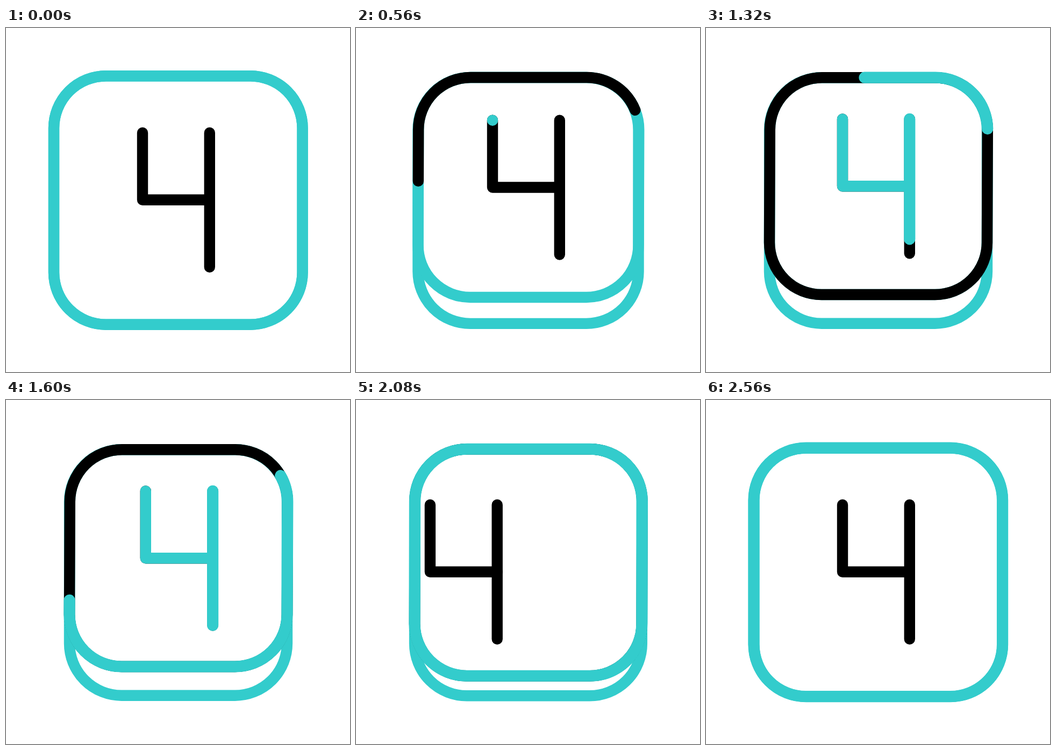
An HTML page that plays this animation: 640x640 px, repeating every 2.8 s.

```html
<!DOCTYPE html>
<html lang="en">
<head>
<meta charset="utf-8">
<title>Key four</title>
<style>
  html, body { margin: 0; width: 100%; height: 100%; overflow: hidden; background: #fff; }
  svg { display: block; width: 100%; height: 100%; }
  path { fill: none; stroke: #000; stroke-width: 20.4; stroke-linecap: round; stroke-linejoin: round; }
  .teal { stroke: #3cc; }
  .wide { stroke-width: 21.2; }
</style>
</head>
<body>
<svg viewBox="0 0 640 640">
  <defs>
    <clipPath id="window"><path class="face"/></clipPath>
    <g id="four">
      <path d="M254 195V319.8H378.8"/>
      <path d="M378.8 195V444.8"/>
    </g>
  </defs>
  <path id="base" class="teal"/>
  <g clip-path="url(#window)">
    <g id="leaving">
      <use href="#four"/>
      <path id="hook" class="teal" pathLength="100" d="M254 195V319.8H378.8"/>
      <path id="stem" class="teal wide" pathLength="100" d="M378.8 195V444.8"/>
    </g>
    <use id="entering" href="#four"/>
  </g>
  <path class="face teal"/>
  <path id="blackTrace" class="face" pathLength="100"/>
  <path id="tealTrace" class="face teal wide" pathLength="100"/>
</svg>
<script>
const LOOP = 2800, STEP = 40, RADIUS = 97, TRAVEL = 422;
const $ = id => document.getElementById(id);
const faces = document.querySelectorAll('.face');
const mix = (a, b, k) => a + (b - a) * k;

// Smooth 0..1 progress of a move that begins at start and lasts duration ms
function ease(t, start, duration) {
  const u = Math.min(1, Math.max(0, (t - start) / duration));
  return u * u * (3 - 2 * u);
}

// Clockwise rounded box from the foot of its left side; lean shifts the top half
function box(left, top, right, bottom, lean = 0) {
  const r = RADIUS, arc = `A${r} ${r} 0 0 1 `;
  const l = left + lean, rt = right + lean;
  return `M${left} ${bottom - r}L${l} ${top + r}${arc}${l + r} ${top}H${rt - r}` +
    `${arc}${rt} ${top + r}L${right} ${bottom - r}${arc}${right - r} ${bottom}` +
    `H${left + r}${arc}${left} ${bottom - r}Z`;
}

// Show a stretch of a path; offset and length are fractions of the whole
function trim(path, offset, length, least = 0) {
  path.style.display = length > least ? '' : 'none';
  path.style.strokeDasharray = length < 1 ? `${length * 100} ${100 - length * 100}` : 'none';
  path.style.strokeDashoffset = -offset * 100;
}

// Show the first part of an open path
function draw(path, length) {
  path.style.display = length > 0 ? '' : 'none';
  path.style.strokeDasharray = length < 1 ? `${length * 100} 200` : 'none';
}

function render(t) {
  const rise = ease(t, 50, 625) - ease(t, 1915, 446);
  const left = mix(89, 118, rise), right = mix(551.6, 523, rise), top = mix(89.2, 92.2, rise);
  $('base').setAttribute('d', box(left, top, right, mix(551.7, 549.7, rise)));
  const face = box(left, top, right, mix(551.7, 496, rise), 0.8 * rise);
  faces.forEach(path => path.setAttribute('d', face));

  const black = ease(t, 100, 1073), teal = ease(t, 1007, 1107);
  trim($('blackTrace'), -0.017 + 0.249 * black, teal < 1 ? black : 0, 0.003);
  trim($('tealTrace'), 0.217 + 0.448 * teal, teal, 0.003);

  draw($('hook'), ease(t, 550, 612));
  draw($('stem'), ease(t, 841, 600));

  const slide = ease(t, 1543, 820) * TRAVEL;
  $('leaving').setAttribute('transform', `translate(${slide} ${-25.6 * rise})`);
  $('entering').setAttribute('transform', `translate(${slide - TRAVEL} 0)`);
}

function tick() {
  render(Math.floor(performance.now() % LOOP / STEP) * STEP);
  requestAnimationFrame(tick);
}
tick();
</script>
</body>
</html>
```
